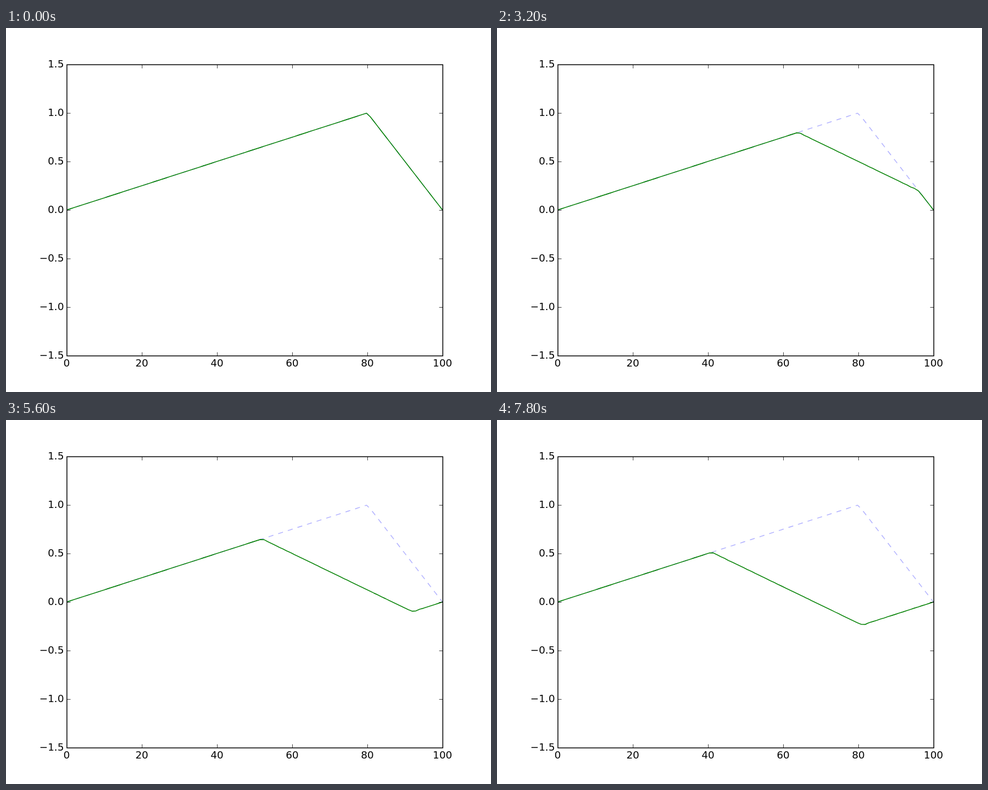
Animation of 800 by 600 pixels, one loop 8 s. Source, as an HTML page:

```html
<!DOCTYPE html>
<html lang="en">
<head>
<meta charset="utf-8">
<title>Plucked string</title>
<style>
  html, body { margin: 0; width: 100%; height: 100%; overflow: hidden; background: #fff; }
  svg { display: block; width: 800px; height: 600px; }
  text { font: 16.667px "DejaVu Sans", sans-serif; }
  polyline { fill: none; stroke-width: 1.389; stroke-linejoin: round; }
</style>
</head>
<body>
<svg viewBox="0 0 800 600">
  <clipPath id="plot"><rect x="100" y="60" width="620" height="480"/></clipPath>
  <g clip-path="url(#plot)">
    <polyline id="rest" stroke="#00f" stroke-opacity="0.3" stroke-dasharray="8.333"/>
    <polyline id="string" stroke="#008000"/>
  </g>
  <path id="ticks" stroke="#000" stroke-width="0.694"/>
  <rect x="100.5" y="60.5" width="620" height="480" fill="none" stroke="#000" stroke-width="1.389"/>
  <g id="xLabels" text-anchor="middle"></g>
  <g id="yLabels" text-anchor="end"></g>
</svg>
<script>
const POINTS = 100, STEPS = 40, STEP_MS = 200;
const DX = 100 / (POINTS - 1);
const COURANT2 = 1 / DX ** 2;

const byId = id => document.getElementById(id);
const px = x => 100 + 6.2 * x;
const py = y => 300 - 160 * y;

function addLabel(group, x, y, content) {
  const label = document.createElementNS("http://www.w3.org/2000/svg", "text");
  label.setAttribute("x", x);
  label.setAttribute("y", y);
  label.textContent = content;
  byId(group).append(label);
}

function drawAxes() {
  let ticks = "";
  for (let x = 0; x <= 100; x += 20) {
    const at = px(x) + 0.5;
    ticks += `M${at} 60.5v6M${at} 540.5v-6`;
    addLabel("xLabels", px(x), 558, x);
  }
  for (let y = -1.5; y <= 1.5; y += 0.5) {
    const at = py(y) + 0.5;
    ticks += `M100.5 ${at}h6M720.5 ${at}h-6`;
    addLabel("yLabels", 95.5, py(y) + 5, y.toFixed(1).replace("-", "\u2212"));
  }
  byId("ticks").setAttribute("d", ticks);
}

// Finite-difference wave equation with both ends held fixed.
function simulate() {
  const start = Array.from({ length: POINTS }, (_, i) => {
    const x = i * DX;
    return x <= 80 ? x / 80 : (100 - x) / 20;
  });
  const bend = (u, i) =>
    i === 0 || i === POINTS - 1 ? 0 : COURANT2 * (u[i + 1] - 2 * u[i] + u[i - 1]);
  const states = [start, start.map((v, i) => v + bend(start, i) / 2)];
  while (states.length < STEPS) {
    const [before, now] = states.slice(-2);
    states.push(now.map((v, i) => 2 * v - before[i] + bend(now, i)));
  }
  return states;
}

const toPoints = state =>
  state.map((y, i) => `${px(i * DX).toFixed(3)},${py(y).toFixed(3)}`).join(" ");

drawAxes();
const shapes = simulate().map(toPoints);
byId("rest").setAttribute("points", shapes[0]);

let shown = -1;
function render() {
  const step = Math.floor(performance.now() / STEP_MS) % STEPS;
  if (step !== shown) byId("string").setAttribute("points", shapes[shown = step]);
  requestAnimationFrame(render);
}
render();
</script>
</body>
</html>
```
